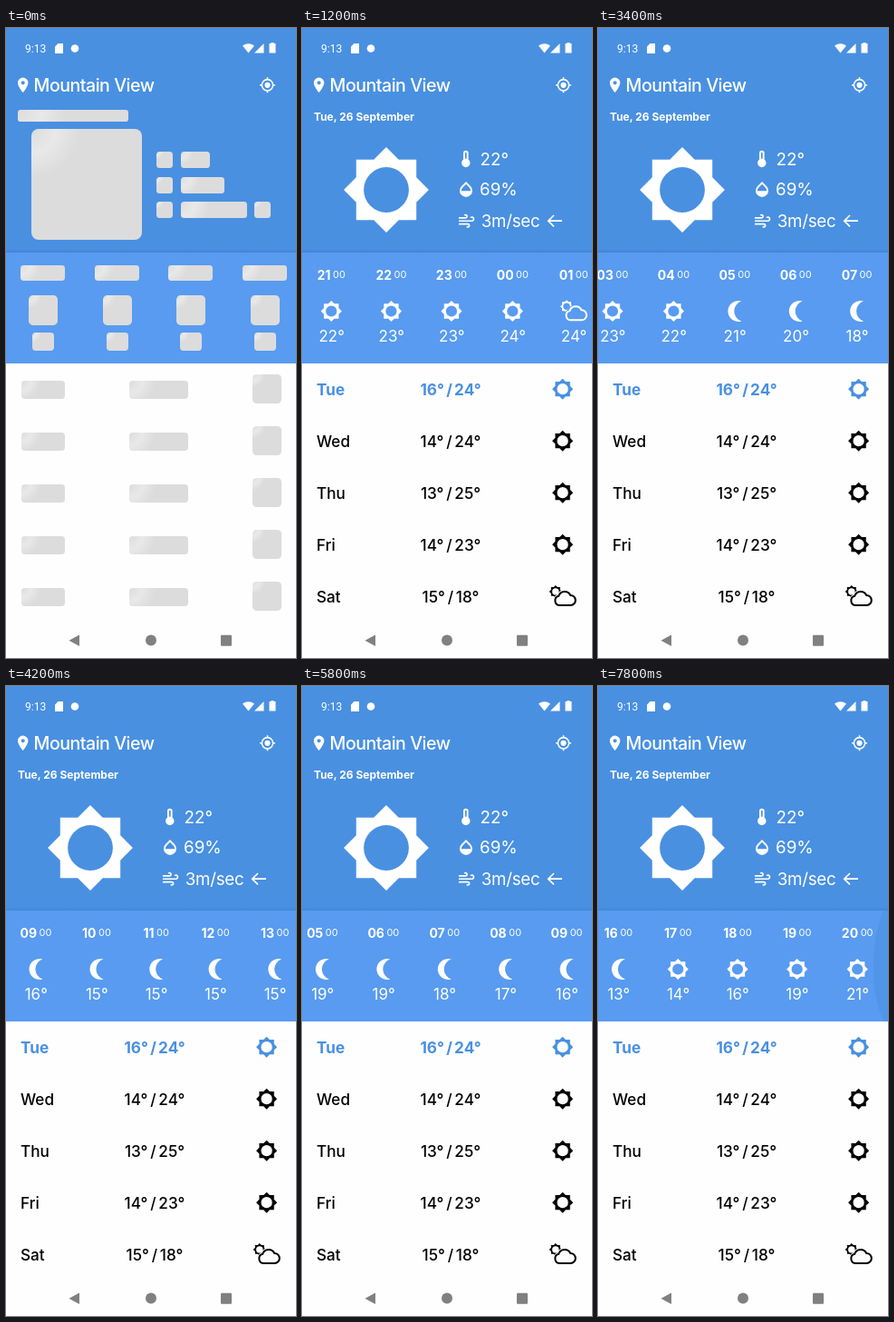
An HTML page for the animation above (8000 ms loop, 320 by 693 pixels).

```html
<!DOCTYPE html>
<html lang="en">
<head>
<meta charset="utf-8">
<title>Weather</title>
<style>
html, body { margin: 0; width: 100%; height: 100%; overflow: hidden; background: #fefefe; }
svg { position: absolute; left: 0; top: 0; display: block; }
text { font-family: Inter, "Liberation Sans", sans-serif; }
.line { fill: none; stroke: #fff; stroke-width: 2; }
.tile {
  position: absolute;
  background: radial-gradient(circle var(--r) at 0 0, #f2f2f200, rgba(242, 242, 242, var(--a)) 50%, #f2f2f200) #dcdcdc;
}
</style>
</head>
<body>
<svg width="320" height="693" viewBox="0 0 320 693">
  <defs>
    <path id="sun" fill-rule="evenodd"/>
    <path id="moon" d="M6.500 9.540A10 10 0 1 1 6.500-9.540A10 10 0 0 0 6.500 9.540z"/>
    <path id="cloud" d="M-3.600 9.800a5.200 5.200 0 0 1-.8-10.200a7 7 0 0 1 13-.8a5.500 5.500 0 0 1 .2 11z"/>
    <linearGradient id="edge" x2="0" y2="1">
      <stop stop-color="#3d82d4" stop-opacity="0"/>
      <stop offset="1" stop-color="#3d82d4" stop-opacity=".7"/>
    </linearGradient>
    <clipPath id="panel"><path d="M0 247h320v122H0z"/></clipPath>
  </defs>

  <path fill="#4990e1" d="M0 0h320v247H0z"/>
  <path fill="url(#edge)" d="M0 243h320v4H0z"/>
  <path fill="#589bf0" d="M0 247h320v122H0z"/>

  <g fill="#fff">
    <text x="21" y="27" font-size="12" style="font-family: Roboto, sans-serif">9:13</text>
    <path d="M57.500 17h5.500v11h-9v-7.500z"/>
    <circle cx="76" cy="22.500" r="4.300"/>
    <path d="M261 19.500q6.500-4.500 13 0l-6.500 8zM284.500 17v10.500H274zM292.500 17v-1h3v1h2v10.500h-7V17z"/>
    <path d="M18.700 54.500a5.700 5.700 0 0 0-5.700 5.700c0 4.300 5.700 10.700 5.700 10.700s5.700-6.400 5.700-10.700a5.700 5.700 0 0 0-5.700-5.700z"/>
    <circle cx="18.700" cy="60.200" r="2" fill="#4990e1"/>
    <text x="30.500" y="69.700" font-size="19.600" font-weight="450" letter-spacing="-.5">Mountain View</text>
    <g transform="translate(288.500 62.800) scale(.77)">
      <circle r="4"/>
      <circle r="8" class="line"/>
      <path class="line" d="M-11 0h3M8 0h3M0-11v3M0 8v3"/>
    </g>
  </g>

  <g id="weather">
    <g fill="#fff">
      <text x="13" y="102.300" font-size="12" font-weight="700">Tue, 26 September</text>
      <use href="#sun" transform="translate(93 178) scale(4.150)"/>
      <g stroke-linecap="round">
        <path stroke="#fff" stroke-width="5.600" d="M180.800 137.500v10"/>
        <circle cx="180.800" cy="148.500" r="4.700"/>
        <path stroke="#4990e1" stroke-width="1.700" d="M180.800 137.500v5.500"/>
      </g>
      <path d="M181 169l5 5a7 7 0 1 1-10 0z"/>
      <path fill="#4990e1" d="M175.800 179.300q0-2.300 1.800-4l3.400-3.500 3.400 3.500q1.800 1.700 1.800 4z"/>
      <path class="line" transform="translate(171.300 202.300) scale(.83)" d="M9.600 4.600A2 2 0 1 1 11 8H2M12.600 19.400A2 2 0 1 0 14 16H2M17.700 7.700A2.500 2.500 0 1 1 19.500 12H2"/>
      <g font-size="18.800">
        <text x="196.500" y="150.500">22°</text>
        <text x="196" y="184.200">69%</text>
        <text x="197.800" y="218.600" letter-spacing="-.3">3m/sec</text>
      </g>
      <path class="line" style="stroke-width: 1.700" d="M287 212.200h-15M278 206l-6.300 6.200 6.300 6.200"/>
    </g>
    <g clip-path="url(#panel)">
      <g id="hours" fill="#fff" text-anchor="middle"></g>
      <ellipse id="glow" cx="329" cy="308" rx="25" ry="72" fill="#4a90e2" opacity=".55"/>
    </g>
    <g id="days" font-size="17.200"></g>
  </g>

  <g fill="#808080">
    <path d="M81 667.500v12.500l-11.500-6.200z"/>
    <circle cx="160" cy="673.600" r="6"/>
    <rect x="237" y="667.700" width="12" height="12" rx="1"/>
  </g>
</svg>
<div id="skeleton"></div>
<script>
const STEP = 200, STEPS = 40, LOADED = 6, FIRST_FLING = 14, FLING_STEPS = 6;
const $ = id => document.getElementById(id);
const range = n => [...Array(n).keys()];

// Eight-pointed star with a round hole
const star = range(16).map(i => {
  const a = i * Math.PI / 8, r = i % 2 ? 8.66 : 11.31;
  return [r * Math.cos(a), r * Math.sin(a)];
});
$("sun").setAttribute("d", `M${star.join("L")}zM-6 0a6 6 0 1 0 12 0a6 6 0 1 0-12 0z`);

const use = (id, x, y, s) => `<use href="#${id}" transform="translate(${x} ${y}) scale(${s})"/>`;

function icon(night, cloudy, x, y, ink, paper) {
  let art = night ? use("moon", 0, 0, 1.15) : use("sun", 0, 0, 1.02);
  if (cloudy) {
    art = (night ? use("moon", -9.5, -4.5, .72) : use("sun", -7.8, -5.3, .62)) +
      `<use href="#cloud" fill="${paper}" stroke="${paper}" stroke-width="4"/>` +
      `<use href="#cloud" fill="none" stroke="${ink}" stroke-width="2"/>`;
  }
  return `<g fill="${ink}" transform="translate(${x} ${y})">${art}</g>`;
}

// Temperature curve: [hours from the first item, degrees]
const curve = [[0, 22], [3, 24], [5, 24], [13, 15], [18, 15], [21, 17],
  [23, 22], [25, 24], [41, 13], [43, 13], [44, 14], [47, 21]];

function tempAt(i) {
  const k = Math.max(1, curve.findIndex(([t]) => t >= i));
  const [t0, v0] = curve[k - 1], [t1, v1] = curve[k];
  return Math.round(v0 + (v1 - v0) * (i - t0) / (t1 - t0));
}

// Items are wider for each 0 in the hour and narrower for each 1
const itemWidth = label => [...label].reduce((w, c) => w + (c === "0" ? .9 : c === "1" ? -.8 : 0), 66.5);

const lefts = [];
let edge = 16;
$("hours").innerHTML = range(48).map(i => {
  const hour = (21 + i) % 24, night = hour > 4 && hour < 17;
  const label = String(hour).padStart(2, "0"), width = itemWidth(label);
  const x = edge + (width - 33) / 2;
  const cloudy = Math.floor(i % 36 / 2) === 2;
  lefts.push(edge);
  edge += width;
  return `<text x="${x}" y="276.500" font-size="14" font-weight="700">${label}` +
    `<tspan dx="2.500" dy="-1.700" font-size="11" font-weight="400">00</tspan></text>` +
    icon(night, cloudy, x, 311.5, "#fff", "#589bf0") +
    `<text x="${x + .3}" y="345.300" font-size="17">${tempAt(i)}°</text>`;
}).join("");

const days = [["Tue", 16, 24], ["Wed", 14, 24], ["Thu", 13, 25], ["Fri", 14, 23], ["Sat", 15, 18]];
$("days").innerHTML = days.map(([name, low, high], i) => {
  const y = 397.2 + 57 * i, ink = i ? "#000" : "#4990e1";
  return `<g fill="${ink}" font-weight="${i ? 500 : 700}"><text x="16" y="${y + 6.3}">${name}</text>` +
    `<text x="164" y="${y + 6.3}" text-anchor="middle" word-spacing="-1.800">${low}° / ${high}°</text></g>` +
    icon(false, name === "Sat", 287.6, y, ink, "#fefefe");
}).join("");

// Loading tiles
const tiles = [];
function tile(x, y, w, h) {
  const el = document.createElement("div");
  el.className = "tile";
  el.style.cssText = `left:${x}px;top:${y}px;width:${w}px;height:${h}px;border-radius:${2 + Math.min(6, h / 12)}px`;
  $("skeleton").append(el);
  tiles.push({ el, size: Math.max(w, h) });
}
tile(13, 90, 122, 13);
tile(28, 111, 122, 122);
[32, 48, 73].forEach((w, i) => {
  tile(166, 136 + 27.5 * i, 18, 18);
  tile(193, 136 + 27.5 * i, w, 18);
});
tile(274, 191, 18, 18);
for (const i of range(4)) {
  const x = 81.5 * i;
  tile(16 + x, 261, 49, 17);
  tile(25 + x, 294, 32, 33);
  tile(29 + x, 335, 24, 20);
}
for (const i of range(5)) {
  const y = 381 + 57 * i;
  tile(17, y + 6.5, 48, 20);
  tile(136, y + 6.5, 65, 20);
  tile(272, y, 32, 32);
}

function shimmer(step) {
  const p = .22 + .13 * step;
  const alpha = Math.min(1, p < .6 ? .35 + p : 1.6 - p);
  for (const { el, size } of tiles) {
    el.style.setProperty("--r", size * p * 2 + "px");
    el.style.setProperty("--a", alpha);
  }
}

// Where the strip rests after each fling
const rests = [0, lefts[12] - 78, lefts[21] - 5, lefts[41] - 34, lefts[47] - 269];
const ease = u => (u * (2 - u)) ** 2;

function scrollAt(step) {
  const t = Math.max(0, Math.min(rests.length - 1, (step - FIRST_FLING) / FLING_STEPS));
  const k = Math.min(rests.length - 2, Math.floor(t));
  return rests[k] + (rests[k + 1] - rests[k]) * ease(t - k);
}

function draw(step) {
  const loading = step < LOADED;
  $("skeleton").style.display = loading ? "" : "none";
  $("weather").style.display = loading ? "none" : "";
  if (loading) return shimmer(step);
  $("hours").setAttribute("transform", `translate(${-scrollAt(step)} 0)`);
  $("glow").style.display = step === STEPS - 1 ? "" : "none";
}

const begin = performance.now();
function tick() {
  draw(Math.floor((performance.now() - begin) / STEP) % STEPS);
  requestAnimationFrame(tick);
}
tick();
</script>
</body>
</html>
```
